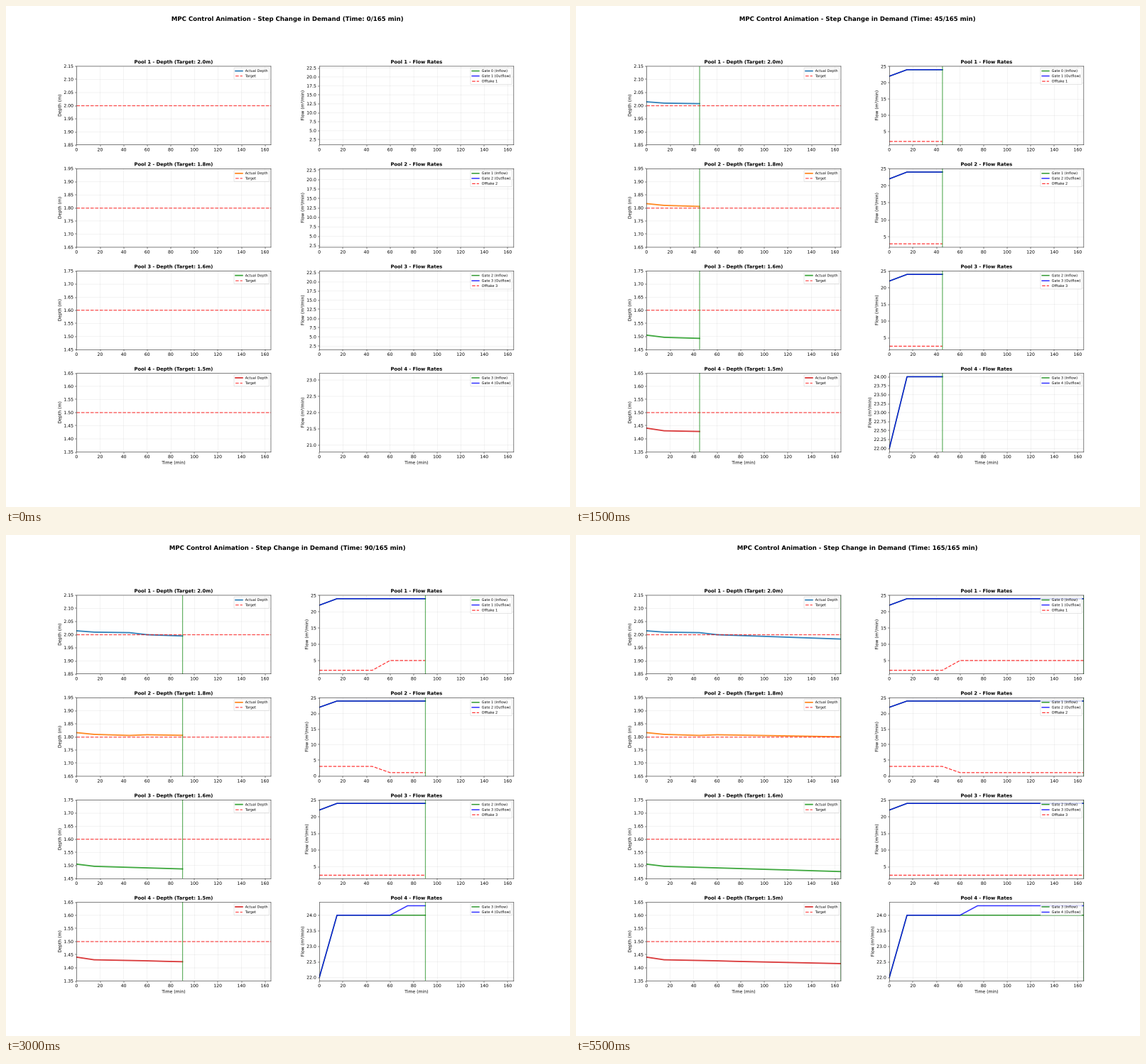
Animation, 794 px wide and 706 px high, one loop 6000 ms. Source, as a matplotlib script:

```python
import numpy as np
import matplotlib.pyplot as plt
from matplotlib.animation import FuncAnimation
from matplotlib.path import Path
from matplotlib.patheffects import AbstractPathEffect


class FineSnap(AbstractPathEffect):
    """Centre straight strokes on a fine 1800 x 1600 grid; text becomes outlines."""

    def draw_path(self, renderer, gc, tpath, affine, rgbFace=None):
        path = affine.transform_path(tpath)
        straight = path.codes is None or path.codes.max() <= Path.LINETO
        if gc.get_linewidth() > 0 and straight:
            xy = path.vertices
            if np.isclose(np.diff(xy, axis=0), 0).any(axis=1).all():
                scale = np.array([1800 / renderer.width, 1600 / renderer.height])
                x, y = (xy * scale).T
                snapped = np.column_stack([np.floor(x + 0.5) + 0.5,
                                           np.ceil(y - 0.5) - 0.5])
                path = Path(snapped / scale, path.codes)
        renderer.draw_path(gc, path, affine - affine, rgbFace)


plt.rcParams.update({
    "font.family": "DejaVu Sans",
    "text.hinting": "none",
    "path.snap": False,
    "path.effects": [FineSnap()],
})

STEP, END = 15, 165
times = np.arange(0, END + STEP, STEP)


def steps_since(start):
    return np.clip(times - start, 0, None) / STEP


def ramp(start):
    """Rise from 0 to 1 within one time step."""
    return np.minimum(steps_since(start), 1)


class Pool:
    def __init__(self, index, target, color, start, drift,
                 offtake=None, change=0.0, change_at=45):
        self.number, self.target, self.color = index + 1, target, color
        # settle, drift down steadily, then react to the change in demand
        self.depth = (start - (0.005 + 0.0017 * index) * ramp(0)
                      - drift * steps_since(STEP)
                      - change * (0.0023 * ramp(change_at)
                                  + 0.00045 * steps_since(change_at + STEP)))
        self.inflow = self.outflow = 22 + 2 * ramp(0)
        self.offtake = None
        if offtake is None:
            self.outflow = self.inflow + change * ramp(change_at)
        else:
            self.offtake = offtake + change * ramp(change_at)


pools = [
    Pool(0, 2.0, "tab:blue", 2.014, 0.0010, offtake=2, change=3),
    Pool(1, 1.8, "tab:orange", 1.816, 0.0020, offtake=3, change=-2),
    Pool(2, 1.6, "tab:green", 1.505, 0.0020, offtake=2.5),
    Pool(3, 1.5, "tab:red", 1.4405, 0.0013, change=0.305, change_at=60),
]

# 17.995 x 16 in at this dpi is a canvas of 794 x 706 px
fig, axes = plt.subplots(4, 2, figsize=(17.995, 16), dpi=44.125)
fig.subplots_adjust(left=0.125, right=0.9, bottom=0.11, top=0.88,
                    hspace=0.3, wspace=0.25)
heading = fig.suptitle("", fontsize=14, fontweight="bold")


def finish(ax, title, ylabel, now, last_row):
    if now > 0:
        ax.axvline(now, color="green", lw=2, alpha=0.6)
    ax.set_xlim(0, END)
    ax.set_title(title, fontsize=11, fontweight="bold")
    ax.set_ylabel(ylabel)
    if last_row:
        ax.set_xlabel("Time (min)")
    ax.grid(True, alpha=0.3)
    ax.legend(loc="upper right", fontsize=8)


def draw_depth(ax, pool, n):
    ax.plot(times[:n], pool.depth[:n], color=pool.color, lw=3, alpha=0.9,
            label="Actual Depth")
    ax.axhline(pool.target, color="red", ls="--", lw=2, alpha=0.7, label="Target")
    ax.set_ylim(pool.target - 0.15, pool.target + 0.15)
    finish(ax, f"Pool {pool.number} - Depth (Target: {pool.target}m)",
           "Depth (m)", times[n - 1], pool is pools[-1])


def draw_flow(ax, pool, n):
    lines = [
        (pool.inflow, "green", "-", 2.5, f"Gate {pool.number - 1} (Inflow)"),
        (pool.outflow, "blue", "-", 2.5, f"Gate {pool.number} (Outflow)"),
    ]
    if pool.offtake is not None:
        lines.append((pool.offtake, "red", "--", 2, f"Offtake {pool.number}"))
    for flow, color, style, width, label in lines:
        ax.plot(times[:n], flow[:n], color=color, ls=style, lw=width,
                alpha=0.8, label=label)
    finish(ax, f"Pool {pool.number} - Flow Rates", "Flow (m³/min)",
           times[n - 1], pool is pools[-1])


def update(frame):
    heading.set_text("MPC Control Animation - Step Change in Demand "
                     f"(Time: {times[frame]}/{END} min)")
    for pool, (left, right) in zip(pools, axes):
        left.clear()
        right.clear()
        draw_depth(left, pool, frame + 1)
        draw_flow(right, pool, frame + 1)
    return []


anim = FuncAnimation(fig, update, frames=len(times), interval=500,
                     repeat=True, repeat_delay=0)
plt.show()
```
